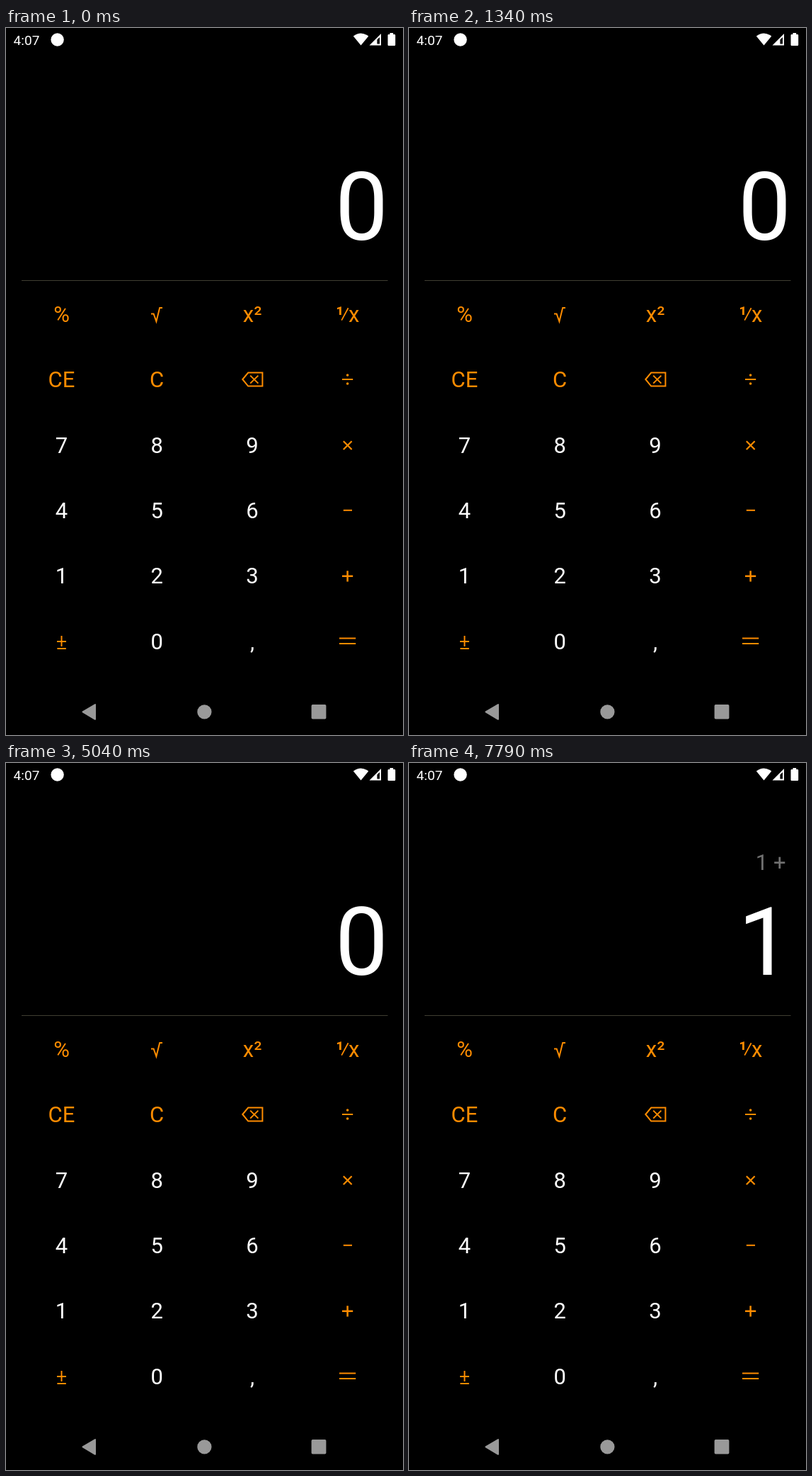
Animation, 561 px wide and 998 px high, one loop 8000 ms. Source, as an HTML page:

```html
<!DOCTYPE html>
<html lang="en">
<head>
<meta charset="utf-8">
<title>Calculator</title>
<style>
  html, body { margin: 0; width: 100%; height: 100%; overflow: hidden; background: #000; }
  svg { display: block; width: 100vw; height: 100vh; font-family: Roboto, sans-serif; }
  #keys, #entry { font-size: 31px; }
  #keys { text-anchor: middle; }
  .op { fill: #ff8c00; }
  .ink { fill: none; stroke: #ff8c00; stroke-width: 2; }
</style>
</head>
<body>
<svg viewBox="0 0 561 998" fill="#fff">
  <rect width="561" height="998" fill="#000"/>

  <!-- status bar -->
  <text x="10.6" y="24" font-size="19.1">4:07</text>
  <circle cx="72.6" cy="16.5" r="9.2"/>
  <path d="M501.5 24.5L490.8 11.6Q501.5 3.6 512.2 11.6Z"/>
  <path fill-rule="evenodd" d="M513.5 24.5L530 8V24.5ZM524.4 16.6V22.6H528V13Z"/>
  <path d="M542.4 9V7H547.2V9H549Q550.2 9 550.2 10.2V23.8Q550.2 25 549 25H540.7Q539.5 25 539.5 23.8V10.2Q539.5 9 540.7 9Z"/>

  <!-- display -->
  <text id="entry" x="532.5" y="151" text-anchor="end" fill="#707070"></text>
  <text id="total" x="540" y="299" text-anchor="end" font-size="133.5">0</text>
  <rect x="22" y="356" width="517.5" height="1" fill="#403e32"/>

  <rect id="press" y="725.8" width="135" height="92.4" rx="2.5" fill="#171717"/>
  <g id="keys">
    <text class="op" x="78.5" y="414.8">%</text>
    <text class="op" x="348.2" y="414.8">x²</text>
    <text class="op" x="471.8" y="414.8" font-weight="500">¹</text>
    <text class="op" x="491.6" y="414.8">x</text>
    <text class="op" x="78.5" y="507">CE</text>
    <text class="op" x="213" y="507">C</text>
  </g>
  <g class="ink">
    <path d="M205 403.5H208.6L212.4 414.2L217.2 395H221"/>
    <path d="M474.2 412.6L483.6 395.2" stroke-width="1.8"/>
    <path d="M334.3 496L342.2 486.6H362.4V505.6H342.2Z"/>
    <path d="M345.2 490.6L356.4 501.6M356.4 490.6L345.2 501.6"/>
    <path d="M475 496H490.2"/>
    <path d="M476.8 583.2L488.6 595M488.6 583.2L476.8 595" stroke-width="2.2"/>
    <path d="M476.8 680.8H489"/>
    <path d="M475 773.8H490.2M482.6 766.2V781.4" stroke-width="2.5"/>
    <path d="M72 866H85M78.5 858V873M72.4 876H84.8"/>
    <path d="M471 861.6H494.2M471 869H494.2"/>
  </g>
  <g class="op">
    <circle cx="482.6" cy="490" r="1.8"/>
    <circle cx="482.6" cy="502" r="1.8"/>
  </g>

  <!-- navigation bar -->
  <g fill="#999">
    <path d="M108.5 965.3L126 955V975.8Z" stroke="#999" stroke-width="2" stroke-linejoin="round"/>
    <circle cx="280.4" cy="965.4" r="10.1"/>
    <rect x="431.6" y="955" width="20.8" height="20.6" rx="1.8"/>
  </g>
</svg>
<script>
const LOOP = 8000;
const COL = 134.75, ROW = 92.45;
const taps = [
  { col: 0, down: 6290, up: 6500 },
  { col: 3, down: 7130, up: 7380 }
];
const $ = id => document.getElementById(id);

// number pad, counted from the row of sevens
["789", "456", "123", " 0,"].forEach((line, row) => {
  [...line].forEach((char, col) => {
    if (char === " ") return;
    const key = document.createElementNS("http://www.w3.org/2000/svg", "text");
    key.setAttribute("x", 78.5 + COL * col);
    key.setAttribute("y", 599.5 + ROW * row);
    key.textContent = char;
    $("keys").append(key);
  });
});

function draw(t) {
  const tap = taps.find(k => t >= k.down && t < k.up);
  $("press").setAttribute("visibility", tap ? "visible" : "hidden");
  if (tap) $("press").setAttribute("x", 11 + COL * tap.col);
  $("total").textContent = t < 6330 ? "0" : "1";
  $("entry").textContent = t < 7210 ? "" : "1 +";
}

const start = performance.now();
function tick() {
  draw((performance.now() - start) % LOOP);
  requestAnimationFrame(tick);
}
tick();
</script>
</body>
</html>
```
